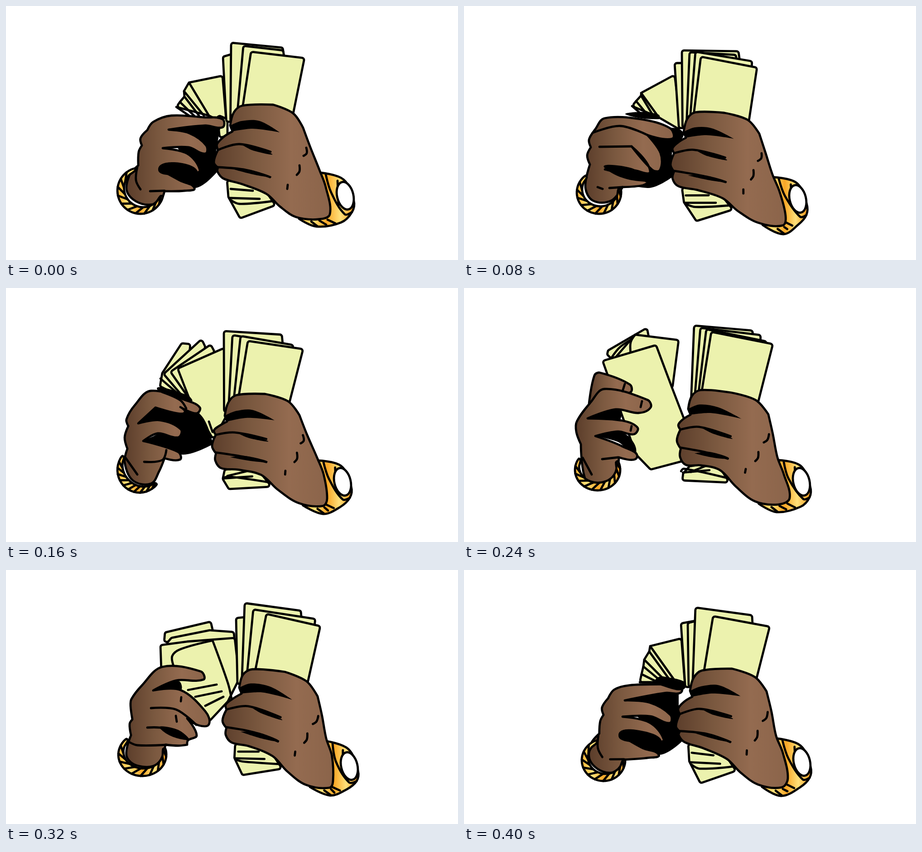
Animation, 998 px wide and 561 px high, one loop 0.48 s. Source, as an HTML page with a canvas:

```html
<!DOCTYPE html>
<html lang="en">
<head>
<meta charset="utf-8">
<title>Counting cash</title>
<style>
html, body { margin: 0; width: 100%; height: 100%; overflow: hidden; background: #fff; }
canvas { display: block; }
</style>
</head>
<body>
<canvas id="stage" width="998" height="561"></canvas>
<script>
const ctx = document.getElementById("stage").getContext("2d");
const PAPER = "#ecf2ae";
const BROWN = ["#5c3e2b", "#7a583f", "#946b50", "#8b644a"];
const GOLD = ["#fbb431", "#ffe27a", "#f9a625", "#ffe07a", "#f59a1c"];
let warp = p => p;

// "x,y" is a smooth point, "x,y!" a corner
const parse = text => text.trim().split(/\s+/).map(p => {
  const [x, y] = p.split(",").map(parseFloat);
  return { x, y, corner: p.endsWith("!") };
});
const place = text => parse(text).map(p => ({ ...p, ...warp(p) }));

// Moves points along with the nearest anchors
function follow(from, to) {
  const a = parse(from), b = parse(to);
  return ({ x, y }) => {
    let sum = 0, dx = 0, dy = 0;
    a.forEach((p, i) => {
      const w = 1 / (Math.hypot(p.x - x, p.y - y) ** 3 + 1);
      sum += w;
      dx += w * (b[i].x - p.x);
      dy += w * (b[i].y - p.y);
    });
    return { x: x + dx / sum, y: y + dy / sum };
  };
}

function handle(p, prev, next, reach) {
  if (p.corner || !prev || !next) return p;
  const dx = next.x - prev.x, dy = next.y - prev.y, d = Math.hypot(dx, dy) || 1;
  return { x: p.x + dx / d * reach, y: p.y + dy / d * reach };
}

function curve(pts, closed) {
  const n = pts.length, at = i => closed ? pts[(i + n) % n] : pts[i];
  const path = new Path2D();
  path.moveTo(pts[0].x, pts[0].y);
  for (let i = 0; i < (closed ? n : n - 1); i++) {
    const a = at(i), b = at(i + 1), reach = Math.hypot(b.x - a.x, b.y - a.y) / 3;
    const c = handle(a, at(i - 1), b, reach), d = handle(b, a, at(i + 2), -reach);
    path.bezierCurveTo(c.x, c.y, d.x, d.y, b.x, b.y);
  }
  if (closed) path.closePath();
  return path;
}

function rounded(pts) {
  const path = new Path2D(), n = pts.length, end = pts[n - 1];
  path.moveTo((pts[0].x + end.x) / 2, (pts[0].y + end.y) / 2);
  pts.forEach((p, i) => path.arcTo(p.x, p.y, pts[(i + 1) % n].x, pts[(i + 1) % n].y, 5));
  path.closePath();
  return path;
}

function paint(path, fill, outline = true) {
  ctx.fillStyle = fill;
  ctx.fill(path);
  if (outline) ctx.stroke(path);
}

function shaded(pts, colors) {
  const xs = pts.map(p => p.x);
  const g = ctx.createLinearGradient(Math.min(...xs), 0, Math.max(...xs), 0);
  colors.forEach((c, i) => g.addColorStop(i / (colors.length - 1), c));
  paint(curve(pts, true), g);
}

const bill = text => paint(rounded(place(text)), PAPER);
const ink = text => paint(curve(place(text), true), "#000", false);
const skin = text => shaded(place(text), BROWN);
const lines = text => text.split("/").forEach(s => ctx.stroke(curve(place(s), false)));

// Bills spread around a pivot, seen edge by edge
function fan(tips, right, px, py, gap) {
  const t = parse(tips);
  paint(rounded([...t, ...parse(right), { x: px, y: py }]), PAPER);
  t.forEach((p, i) => {
    ctx.beginPath();
    ctx.moveTo(p.x, p.y);
    ctx.lineTo(px - gap * (t.length - 1 - i), py);
    ctx.stroke();
  });
}

// Upright bills from their top corners, narrowing towards the grip
function stack(tops, grip, knuckle) {
  const t = parse(tops);
  for (let i = 0; i < t.length; i += 2) {
    paint(rounded([t[i], t[i + 1], { x: knuckle.x - 24, y: knuckle.y - 20 },
      { x: (grip.x + t[i].x) / 2, y: grip.y - 6 }]), PAPER);
  }
}

function bracelet(x, y, rx, ry, from, to) {
  const outer = [], inner = [], n = 11;
  for (let i = 0; i <= n; i++) {
    const k = i / n, a = (from + (to - from) * k) * Math.PI / 180;
    const thick = 5 + 12 * Math.sin(Math.PI * k), c = Math.cos(a), s = Math.sin(a);
    outer.push({ x: x + rx * c, y: y + ry * s });
    inner.push({ x: x + (rx - thick) * c, y: y + (ry - thick) * s });
  }
  shaded([...outer, ...inner.slice().reverse()], GOLD);
  for (let i = 1; i < n; i++) {
    ctx.beginPath();
    ctx.moveTo(outer[i].x, outer[i].y);
    ctx.lineTo(inner[i - 1].x, inner[i - 1].y);
    ctx.stroke();
  }
}

// Grip, top, knuckle, ring tip, little finger, wrist, heel, dial, cuff, lower bills
const GRIP = "494,262 590,218 656,268 459,345 475,375 693,370 713,462 749,419 685,487 517,469";

function rightHand(anchors, tops) {
  const a = parse(anchors);
  stack(tops, a[0], a[2]);
  warp = follow(GRIP, anchors);
  bill("488,385 491,422 517,469 595,440 560,390");
  lines("496,404 545,408 / 494,424 560,426 / 497,429 515,437 588,431");
  shaded(place("693,368! 745,383 768,430 764,455 740,478 685,487 647,470! 714,460!"), GOLD);
  lines("706,372 718,412 748,460 764,455 / 732,386 734,440");
  for (let i = 0; i < 3; i++) lines(`${674 + i * 18},${476 - i * 2} ${687 + i * 20},${486 - i * 3}`);
  const dial = warp({ x: 749, y: 419 }), face = new Path2D();
  face.ellipse(dial.x, dial.y, 18, 31, -0.23, 0, 7);
  paint(face, "#fff");
  skin(`495,264! 503,235 522,220 590,218! 634,237 656,269! 672,312 692,362 706,400 715,460 690,471 640,466
    605,443 575,415 520,393 480,381 467,366 468,357! 459,345 468,318! 466,305 482,288 500,277!`);
  ink("495,264! 520,254 560,254 604,279! 545,271 500,277!");
  ink("517,304! 586,326 545,319");
  ink("500,360! 540,362 583,378");
  lines(`468,318 515,305 584,322 / 468,356 530,362 583,378 / 663,313 664,325 657,331
    / 648,352 648,365 642,373 / 622,395 621,404`);
  warp = p => p;
}

function closedFist() {
  ink("356,270 440,264 474,266! 462,340 468,364! 418,402 345,375! 385,330");
  skin(`325,256 365,242 440,246 478,250 478,268 440,264 359,273! 405,281 442,308 440,326 403,312 346,314!
    400,326 428,362 412,369 380,355 345,364! 385,386 416,402 395,408 350,409! 338,433 300,437 268,412
    272,375 292,352! 293,322 300,308! 297,292 312,274!`);
  ink("336,360 383,346 424,371 380,375");
  lines("290,355 287,385 297,405 / 318,409 350,408");
}

function pinch() {
  fan("376,223 384,212 394,200 393,188 404,169", "478,154 487,262", 448, 242, 11);
  bill("466,240 489,250 489,285 472,292");
  closedFist();
  bracelet(297, 408, 51, 51, 15, 255);
  rightHand(GRIP, "479,112 520,100 497,81 611,92 524,88 612,98 541,101 659,115");
}

function tuck() {
  fan("371,221 380,210 391,198 391,192", "465,152 480,275", 430, 246, 10);
  ink("358,240 390,234 430,240 430,250");
  ink("400,270! 470,270 485,285 460,320 465,374! 405,402 330,365 380,320");
  skin(`290,272 310,248 390,250 455,270 460,293 405,285! 434,325 433,362 416,362 370,310! 411,365 375,363
    311,361! 405,388 395,396 350,400! 325,430 285,430 268,400 278,350! 272,330 280,312! 276,295`);
  ink("311,358 370,358 405,388");
  lines("284,280 345,265 405,285 / 299,311 370,310 / 295,400 306,404 / 321,402 350,400");
  bracelet(298, 412, 49, 47, -11, 232);
  rightHand("484,276 575,236 652,281 456,350 468,392 682,380 708,465 737,426 705,504 513,475",
    "465,126 490,126 481,98 606,100 498,102 600,108 511,101 636,122 523,112 647,136");
}

function lift() {
  bill("340,217 345,188 388,122 407,124 395,245");
  bill("348,190 432,113 440,130 395,245");
  bill("363,185 452,125 460,140 405,245");
  bill("379,178 483,132 488,280 458,335 405,245");
  lines("341,200 385,238 / 425,278 452,330 / 448,295 456,318");
  ink("335,226 400,236 410,250");
  ink("291,300! 330,262 425,276 457,345! 390,368 300,338! 350,300");
  skin(`266,290 285,258 320,227 400,249 428,264 420,277 385,263! 395,274 380,277 330,264! 292,299! 340,292
    386,312 380,330 335,321 303,338! 380,362 384,379 350,376! 338,405 320,432 280,425 262,385 268,355!
    262,330 270,305!`);
  lines("345,230 385,248 398,266 / 305,384 345,380 354,358 / 264,375 290,412");
  bracelet(295, 402, 49, 50, 40, 218);
  rightHand("482,280 572,234 648,280 455,349 470,392 688,383 707,467 743,428 700,499 492,444",
    "481,95 609,103 500,104 632,126 518,106 634,126 534,117 656,135");
}

function spread() {
  bill("316,147 318,138 404,88 420,170 330,160");
  lines("325,155 345,130 380,108");
  bill("333,155 378,103 474,115 460,222 400,200");
  lines("378,103 368,120 368,145");
  bill("306,161 424,126 460,222 490,300 484,382 412,401 380,368");
  skin("276,255! 288,193 300,187 366,213 368,230 300,262!");
  ink("273,288! 345,268 345,292!");
  ink("290,327! 345,316 380,365 340,340");
  skin(`249,295 280,252 310,223 405,247 412,264 385,276 335,268 273,288! 350,293 383,308 375,323 340,317
    290,327! 350,350 382,374 342,374! 332,420 300,435 270,428 258,345! 248,318`);
  lines("355,212 350,228 / 393,250 390,263 / 370,305 368,315 / 305,378 340,374 / 262,375 282,412");
  bracelet(295, 402, 50, 45, -25, 213);
  rightHand("494,265 590,231 672,278 470,337 485,385 693,382 717,466 745,428 690,495 482,425",
    "508,83 637,94 522,88 655,104 535,91 668,118 546,97 682,124");
}

function gather() {
  bill("349,160 351,138 452,114 458,140");
  bill("350,168 365,150 450,133 503,137 505,160");
  bill("341,166 400,158 505,150 515,240 490,290 448,335 343,225");
  lines(`370,212 367,190 385,175 455,156 / 457,158 490,250 498,284 / 402,265 465,253
    / 418,280 476,268 / 440,300 480,280`);
  ink("312,268! 380,245 385,267");
  skin(`277,285 300,255 345,214 430,224 436,242 375,244 325,266! 385,265 440,312 448,341 425,343 400,328!
    421,365 402,376 400,386! 380,388 352,386! 335,428 290,432 266,410 276,365! 273,340 279,330! 275,300`);
  ink("340,350 380,353 402,376");
  lines(`320,305 375,308 420,342 / 312,348 350,350 402,375 / 272,380 290,387 355,386
    / 387,281 386,290 / 375,322 377,335`);
  bracelet(301, 408, 53, 47, -17, 228);
  rightHand("514,258 616,225 688,278 478,333 493,375 708,380 720,468 758,433 715,498 522,453",
    "508,106 530,104 527,73 651,90 546,87 683,108 575,97 694,124");
}

function close() {
  fan("388,248 392,230 396,213 398,198 409,180 411,168", "480,151 488,255", 468, 248, 10);
  warp = follow("482,258 325,256 300,308 442,318 428,362 416,402 268,412 345,420 468,364 359,273 346,314 345,364",
    "482,261 332,264 308,320 456,330 441,374 430,408 278,420 348,430 482,378 355,288 350,324 350,368");
  closedFist();
  warp = p => p;
  ink("422,243 440,235 490,258 430,254");
  bracelet(308, 420, 48, 46, 0, 250);
  rightHand("498,265 592,218 668,267 468,345 482,374 690,374 713,462 746,424 700,499 522,471",
    "479,118 512,112 494,117 515,112 511,83 636,100 550,102 675,125");
}

const poses = [pinch, tuck, lift, spread, gather, close];
ctx.strokeStyle = "#000";
ctx.lineWidth = 4.8;
ctx.lineCap = ctx.lineJoin = "round";

function tick() {
  ctx.fillStyle = "#fff";
  ctx.fillRect(0, 0, 998, 561);
  poses[Math.floor(performance.now() / 80) % poses.length]();
  requestAnimationFrame(tick);
}
tick();
</script>
</body>
</html>
```
